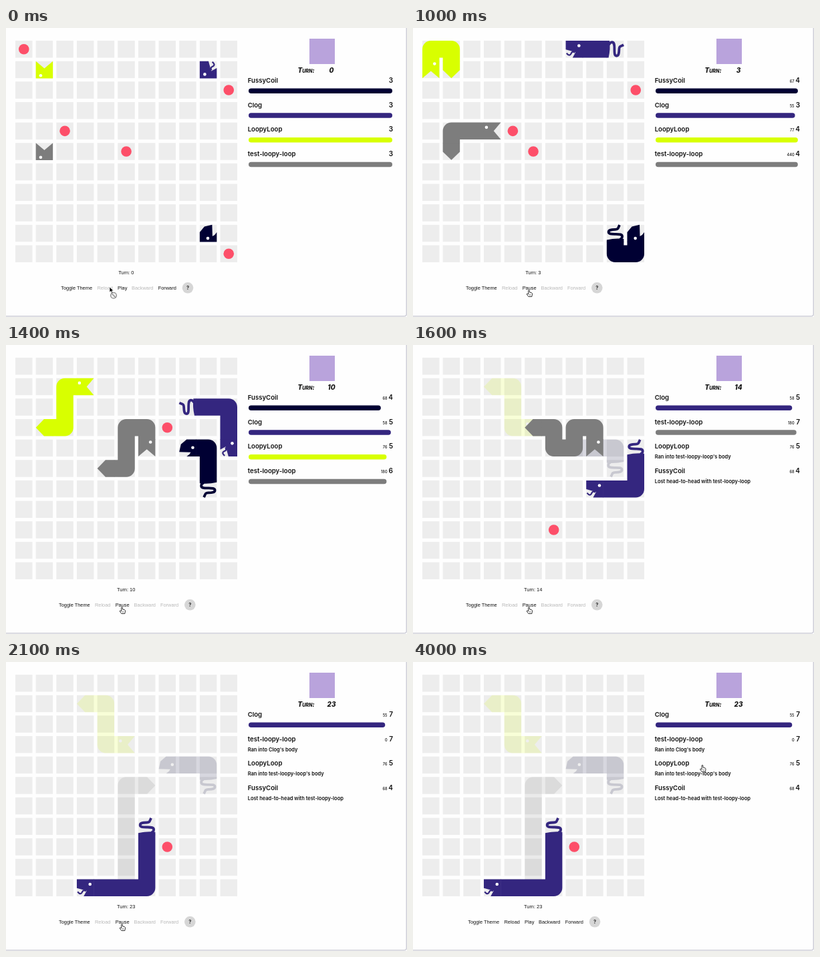
Write an HTML page that moves like this. It is 600x433 px and loops after 4200 ms.

```html
<!DOCTYPE html>
<html lang="en">
<head>
<meta charset="utf-8">
<title>Snake match</title>
<style>
html, body { margin: 0; width: 100%; height: 100%; overflow: hidden; background: #fefefe; }
svg { display: block; width: 600px; height: 433px; }
text { fill: #111; font-family: Inter, sans-serif; }
.ui { font: 7.4px "Liberation Sans", Arial, sans-serif; }
.off { fill: #b8b8b8; }
.name { font-size: 9.6px; font-weight: 600; }
.note { font-size: 7.5px; font-weight: 600; }
.ms { font-size: 5.6px; font-weight: 500; text-anchor: end; }
.len { font-size: 10px; font-weight: 600; text-anchor: end; }
.mark { font-size: 10px; font-weight: 800; font-style: italic; font-variant: small-caps; }
.mid { text-anchor: middle; }
</style>
</head>
<body>
<svg viewBox="0 0 600 433">
  <rect width="600" height="433" fill="#fefefe"/>
  <path d="M0 431.7H596Q599.3 431.7 599.3 428V0" fill="none" stroke="#cfcfd8" stroke-width="1.5"/>
  <g id="grid" fill="#ededed"></g>
  <g id="board"></g>
  <rect x="454" y="16" width="38" height="38" fill="#b9a3dc"/>
  <text class="mark" x="436.5" y="66.5">Turn:</text>
  <g id="panel"></g>
  <g id="controls"></g>
  <g id="cursor"></g>
</svg>
<script>
const LOOP = 4200, STEP = 100, PITCH = 30.65, SIZE = 25.5, HALF = SIZE / 2;
const $ = id => document.getElementById(id);
const DIRS = { U: [0, -1], D: [0, 1], L: [-1, 0], R: [1, 0] };
const TURNS = { '0,-1': 'rotate(-90)', '0,1': 'rotate(90)', '-1,0': 'scale(-1 1)', '1,0': '' };

// Parts are drawn facing right, around the middle of a cell.
const HEADS = {
  fang: '<path d="M-13-12.75H12.75L2 0 12.75 12.75H-13Z"/><circle cx="-8.8" cy="-5.5" r="2.3" fill="#fff"/>',
  tongue: '<path d="M-13-12.75H12.75V.4L-2 4.5 2.5 12.75H-13Z"/>' +
    '<path d="M-1 5C3 2.500 4 5 5 7S8 10.500 11.500 6" fill="none" stroke="currentColor" stroke-width="2.2"/>' +
    '<circle cx="-7" cy="-5.2" r="2.3" fill="#fff"/>',
  jaw: '<path d="M-13-12.75H1.700L10.200-5.700 12.75 5.800-4.500 6.300Q-3 10 1.700 12.75H-13Z"/>' +
    '<circle cx="-7.5" cy="-.6" r="2.3" fill="#fff"/>'
};
const TAILS = {
  point: '<path d="M-12.75 0L-.5-12.75H13V12.75H-.5Z"/>',
  curl: '<path d="M8.500-12.75H13V12.75H10Q7 0 8.500-12.75Z"/>' +
    '<path d="M-12.500-6.500C-8-4-6-5-5.800 0S-5.500 10-2 10 1.200 5 1.200-1 1.500-10.500 5-10.500 7-8 10-7"' +
    ' fill="none" stroke="currentColor" stroke-width="3.8"/>'
};

const snakes = [
  { name: 'FussyCoil', color: '#000033', head: 'jaw', tail: 'curl', start: [9, 9],
    moves: 'DRULUUUUULL', eats: [2], end: 11, note: 'Lost head-to-head with test-loopy-loop',
    ms: t => 67 + (t >> 3) },
  { name: 'Clog', color: '#34267f', head: 'tongue', tail: 'curl', start: [9, 1],
    moves: 'ULLDDRRRDDDDLLLLDDDDLLL', eats: [8, 9, 16, 18], end: 99,
    ms: t => 55 + 3 * (3 - t % 4) },
  { name: 'LoopyLoop', color: '#d8ff00', head: 'fang', tail: 'point', start: [1, 1],
    moves: 'ULDRDDRUURRDDR', eats: [2, 6], end: 14, note: "Ran into test-loopy-loop's body",
    ms: t => 76 + t % 2 },
  { name: 'test-loopy-loop', color: '#7d7d7d', head: 'fang', tail: 'point', start: [1, 5],
    moves: 'URRRDRUURDRURDDLLLDDDDD', eats: [2, 4, 6, 12], end: 23, note: "Ran into Clog's body",
    ms: t => t < 23 ? 180 + 260 * (t % 2) : 0 }
];
for (const s of snakes) {
  s.path = [s.start];
  for (const m of s.moves) {
    const [x, y] = s.path[s.path.length - 1], [dx, dy] = DIRS[m];
    s.path.push([x + dx, y + dy]);
  }
}

// column, row, first turn, turn eaten
const food = [
  [0, 0, 0, 2], [10, 2, 0, 8], [2, 4, 0, 2], [5, 5, 0, 6], [10, 10, 0, 2],
  [4, 4, 2, 4], [1, 3, 4, 6], [10, 3, 8, 9], [7, 3, 9, 12], [6, 8, 12, 18],
  [6, 6, 15, 16], [7, 8, 19, 99]
];

const cx = c => 14 + HALF + c * PITCH;
const cy = r => 19 + HALF + r * PITCH;
const text = (cls, x, y, str) => `<text class="${cls}" x="${x}" y="${y}">${str}</text>`;
const toward = (a, b) => [b[0] - a[0], b[1] - a[1]];
const part = (cell, dir, art) =>
  `<g transform="translate(${cx(cell[0])} ${cy(cell[1])}) ${TURNS[dir]}">${art}</g>`;
const edge = (cell, dir, k) => [cx(cell[0]) + dir[0] * k, cy(cell[1]) + dir[1] * k];

function drawSnake(s, turn) {
  const t = Math.min(turn, s.end);
  const count = Math.min(t + 1, 3 + s.eats.filter(e => e < t).length);
  const cells = s.path.slice(t + 1 - count, t + 1);
  const head = cells[count - 1];
  let face = DIRS.U, out = '';
  if (count > 1) {
    face = toward(cells[count - 2], head);
    const back = toward(cells[0], cells[1]);
    const line = [edge(cells[0], back, HALF - .3),
      ...cells.slice(1, -1).map(c => [cx(c[0]), cy(c[1])]),
      edge(head, face, .3 - HALF)];
    out = part(cells[0], back, TAILS[s.tail]) +
      `<polyline points="${line.join(' ')}" fill="none" stroke="currentColor" stroke-width="${SIZE}" stroke-linejoin="round"/>`;
  }
  out += part(head, face, HEADS[s.head]);
  return `<g color="${s.color}" fill="currentColor" opacity="${turn >= s.end ? .15 : 1}">${out}</g>`;
}

function drawBoard(turn) {
  const dots = food.filter(f => turn >= f[2] && turn < f[3])
    .map(f => `<circle cx="${cx(f[0])}" cy="${cy(f[1])}" r="7.8" fill="#fd4f69"/>`);
  const order = [...snakes].sort((a, b) => (turn >= b.end) - (turn >= a.end));
  $('board').innerHTML = dots.join('') + order.map(s => drawSnake(s, turn)).join('');
}

function drawPanel(turn) {
  const rank = s => turn >= s.end ? s.end : 99;
  const rows = [...snakes].sort((a, b) => rank(b) - rank(a)).map((s, i) => {
    const y = i * 36.7, t = Math.min(turn, s.end);
    const eaten = s.eats.filter(e => e <= t);
    const health = 100 - t + (eaten.length ? eaten[eaten.length - 1] : 0);
    return text('name', 361.7, 81.8 + y, s.name) +
      (turn ? text('ms', 570.5, 81.8 + y, s.ms(t)) : '') +
      text('len', 579, 82 + y, 3 + eaten.length) +
      (turn >= s.end ? text('note', 361.7, 97 + y, s.note)
        : `<rect x="363" y="${90.6 + y}" width="${2.15 * health}" height="7.5" rx="3.75" fill="${s.color}"/>`);
  });
  $('panel').innerHTML = text('mark mid', 487, 66.5, turn) + rows.join('');
}

function drawControls(turn, playing) {
  const labels = ['Toggle Theme', 'Reload', playing ? 'Pause' : 'Play', 'Backward', 'Forward'];
  const xs = playing ? [79, 133, 163.7, 191.5, 231] : [82.3, 136.5, 167, 188, 227.7];
  const off = playing ? [1, 3, 4] : turn ? [] : [1, 3];
  const q = playing ? 275.3 : 272;
  $('controls').innerHTML = text('ui mid', 179.7, 368.8, 'Turn: ' + turn) +
    labels.map((l, i) => text('ui' + (off.includes(i) ? ' off' : ''), xs[i], 392, l)).join('') +
    `<circle cx="${q}" cy="389.3" r="8.3" fill="#d6d6d6"/>` +
    `<text class="note mid" x="${q}" y="392.2">?</text>`;
}

const ARROW = '<path d="M0 0V8L1.900 6.300 3.200 9.300 4.700 8.600 3.400 5.800H6Z" fill="#000" stroke="#fff" stroke-width=".7"/>';
const BAN = '<g fill="none" stroke="#8b8b8b" stroke-width="1.3"><circle cx="6" cy="12.7" r="4.4" fill="#eee"/><path d="M3 9.600L9 15.800"/></g>';
const HAND = '<path d="M-.9 1Q0-.5 .9 1V4L4 4.800Q5.300 5.200 5 7L4.300 10.500H-.7L-3.400 6.800Q-3.200 5.500-1.800 6.300L-.9 7Z" fill="#fff" stroke="#222" stroke-width=".9" stroke-linejoin="round"/>' +
  '<path d="M.9 7V9M2.400 7V9" stroke="#222" stroke-width=".5"/>';
const stops = [[200, 155, 388], [500, 173.5, 392], [2700, 173.5, 392], [3200, 286.5, 305], [3900, 433, 154]];

function drawCursor(t) {
  let i = stops.findIndex(s => s[0] > t);
  if (i < 0) i = stops.length - 1;
  const b = stops[i], a = stops[Math.max(0, i - 1)];
  const k = b[0] > a[0] ? Math.min(1, (t - a[0]) / (b[0] - a[0])) : 0;
  const x = a[1] + (b[1] - a[1]) * k, y = a[2] + (b[2] - a[2]) * k;
  const onLink = (y > 383 && x > 165) || (x > 362 && y < 210);
  $('cursor').innerHTML = `<g transform="translate(${x} ${y})">` +
    (onLink ? HAND : x < 161 ? ARROW + BAN : ARROW) + '</g>';
}

let cells = '';
for (let r = 0; r < 11; r++)
  for (let c = 0; c < 11; c++)
    cells += `<rect x="${cx(c) - HALF}" y="${cy(r) - HALF}" width="${SIZE}" height="${SIZE}"/>`;
$('grid').innerHTML = cells;

const begin = performance.now();
let last = -1;
function frame() {
  const t = Math.floor((performance.now() - begin) % LOOP / STEP) * STEP;
  if (t !== last) {
    last = t;
    const turn = Math.max(0, Math.min(23, Math.floor((t - 800) * .0177)));
    drawBoard(turn);
    drawPanel(turn);
    drawControls(turn, t >= 600 && t < 2200);
    drawCursor(t);
  }
  requestAnimationFrame(frame);
}
frame();
</script>
</body>
</html>
```
